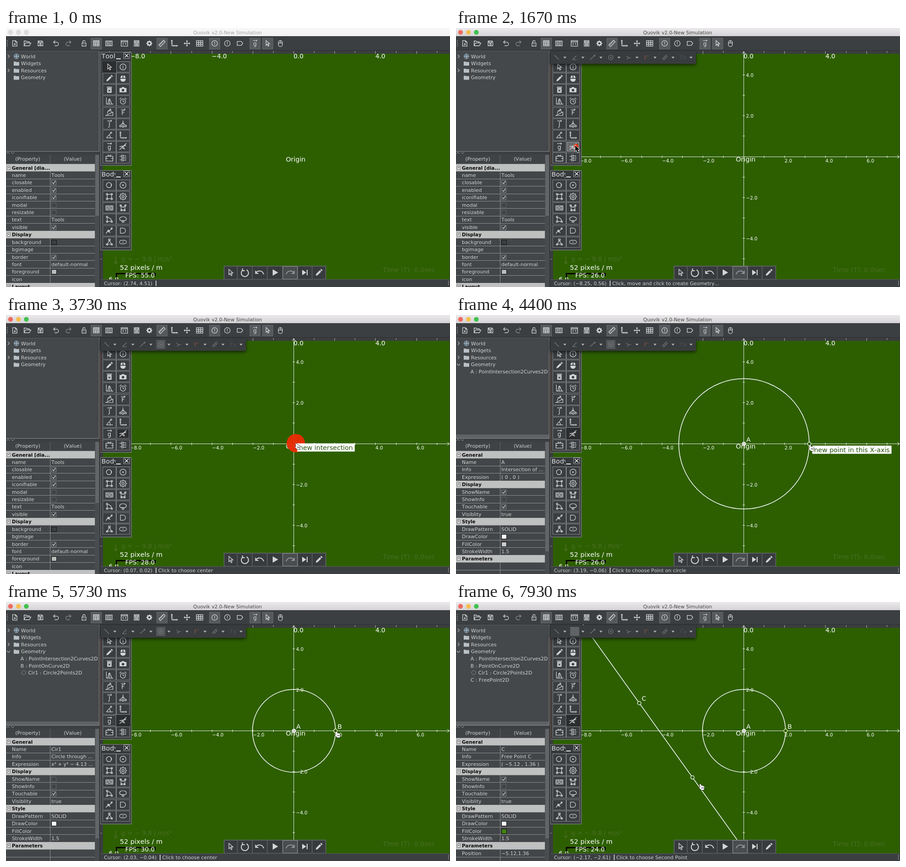
An HTML page with a canvas for the animation above (8 s loop, 979 px wide and 572 px high).

```html
<!DOCTYPE html>
<html lang="en">
<head>
<meta charset="utf-8">
<title>Geometry simulation</title>
<style>
html, body { margin: 0; width: 100%; height: 100%; overflow: hidden; background: #3c3f41; }
canvas { display: block; width: 979px; height: 572px; }
</style>
</head>
<body>
<canvas id="stage" width="979" height="572"></canvas>
<script>
const g = document.getElementById('stage').getContext('2d');
const LOOP = 8000, OX = 635, OY = 284.5, UNIT = 45.1;
const FONT = '"DejaVu Sans", sans-serif';
const PANEL = '#3c3f41', LIGHT = '#d4d6d7', GREEN = '#2d5f00';

// ---------- helpers ----------
function box(x, y, w, h, fill, line) {
  if (fill) { g.fillStyle = fill; g.fillRect(x, y, w, h); }
  if (line) { g.strokeStyle = line; g.lineWidth = 1; g.strokeRect(x + .5, y + .5, w - 1, h - 1); }
}
function text(s, x, y, color = '#d0d2d3', size = 10.9, align = 'left', weight = '') {
  g.font = `${weight} ${size}px ${FONT}`;
  g.fontKerning = 'none';
  g.fillStyle = color;
  g.textAlign = align;
  g.fillText(s, x, y);
}
function path(d, color, width = 1) {
  g.strokeStyle = color;
  g.lineWidth = width;
  g.stroke(new Path2D(d));
}
function ring(x, y, r, line, fill, width = 1.4) {
  g.beginPath();
  g.arc(x, y, r, 0, 7);
  if (fill) { g.fillStyle = fill; g.fill(); }
  if (line) { g.strokeStyle = line; g.lineWidth = width; g.stroke(); }
}

// ---------- icons, drawn around 0,0; '*' means filled ----------
const C = (x, y, r) => `M${x - r} ${y}a${r} ${r} 0 1 0 ${2 * r} 0a${r} ${r} 0 1 0 ${-2 * r} 0`;
function gearPath(r) {
  let d = '';
  for (let i = 0; i < 32; i++) {
    const a = (i - .5) * Math.PI / 16, k = i % 4 < 2 ? r : r * .74;
    d += `${i ? 'L' : 'M'}${(k * Math.cos(a)).toFixed(2)} ${(k * Math.sin(a)).toFixed(2)}`;
  }
  return d + 'Z';
}
const ICONS = {
  file: 'M-5-7H2L6-3V7H-5ZM2-7V-3H6M-2 2H3M.5-.5V4.5',
  folder: 'M-8 6V-6H-3L-1-4H5V-1M-8 6L-5-1H9L5 6Z',
  save: 'M-6-6H4L6-4V6H-6ZM-4-6V-2H3V-6' + C(0, 2, 2),
  undo: 'M-2-7L-6-3L-2 1M-6-3H2a4 4 0 0 1 0 9H-3',
  redo: 'M2-7L6-3L2 1M6-3H-2a4 4 0 0 0 0 9H3',
  lock: 'M-5-1H5V7H-5ZM-3-1V-4a3 3 0 0 1 6 0M0 2V4',
  table: 'M-7-7H7V6H-7ZM-7-5H7M-7-2H7M-7 2H7M-2-2V6M3-2V6',
  panel: 'M-8-6H8V6H-8ZM2-6V6M-6-3H0M-6 0H0M-6 3H0M4-3H6M4 0H6M4 3H6',
  code: 'M-8-7H8V7H-8ZM-8-4H8M-2-1L-4 1L-2 3M2-1L4 1L2 3',
  calc: 'M-6-7H6V7H-6ZM-4-5H4V-2H-4ZM-4 1H4M-4 4H4M-2-1V6M2-1V6',
  gear: '*' + gearPath(7.5) + C(0, 0, 2.6),
  ruler: 'M-8 4L4-8L8-4L-4 8ZM-5 1L-3 3M-2-2L0 0M1-5L3-3',
  axes: 'M-6-8V6H8M-8-6L-6-8L-4-6M6 4L8 6L6 8M-2 4V8M2 4V8M-8 1H-4M-8-3H-4',
  move: 'M-7 0H7M0-7V7M-5-2L-7 0L-5 2M5-2L7 0L5 2M-2-5L0-7L2-5M-2 5L0 7L2 5',
  grid: 'M-8-7H8V7H-8ZM-8-2.3H8M-8 2.3H8M-2.7-7V7M2.7-7V7',
  info: C(0, 0, 7) + 'M0-4V1M0 2.5V4',
  about: C(0, 0, 7) + 'M0 4V-1M0-2.5V-4',
  tag: 'M-7-5H3L7 0L3 5H-7Z',
  arrow: 'M-4-7V5L-1 2L1 7L3 6L1 1H5Z',
  mouse: 'M-5-2a5 5 0 0 1 10 0V3a5 5 0 0 1-10 0ZM-5-1H5M0-7V-1',
  pencil: '*M-7 7L-6 3L2-5L5-2L-3 6ZM3-6L5-8L8-5L6-3Z',
  mouse2: '*M-6-1a6 7 0 0 1 5-6V-1ZM1-7a6 7 0 0 1 5 6H1ZM-6 1H6V3a6 5 0 0 1-12 0Z',
  trash: '*M-6-7H6V-5H-6ZM-5-4H5V7H-5ZM-2-1L0 1L2-1L3 0L1 2L3 4L2 5L0 3L-2 5L-3 4L-1 2L-3 0Z',
  camera: '*M-8-4H-4L-2-6H2L4-4H8V6H-8Z' + C(0, 1, 3),
  graph: 'M-7-8V7H9M-5 7C-2 7-3-5 0-5S3 7 7 7M0-5V7',
  clock: C(0, 1, 6) + 'M0-3V1L3 2M-8-4L-4-8M8-4L4-8',
  slope: 'M-8 7H8V-1ZM-5 3L-3-4L3-6L5 0M-1-2L3-8M0-8H3V-5',
  forks: 'M0-8V-3L-5 3M0-3L5 3M0-3V3' + C(-6, 5, 2) + C(0, 6, 2) + C(6, 5, 2),
  angle: 'M-7 6H8M-7 6L3-5M-1-1a7 7 0 0 1 3 7' + C(4, -6, 1.5),
  geom: 'M-8 7L8-8M-8 0L5-2M0-1L4 6M-3 2L2 5M4-4L7-2',
  frame: 'M-8-4H8V7H-8ZM-9 1H-4M4 1H9M-3-8V-4M3-8V-4M-2-6H2',
  piston: 'M-8-4H-3V4H-8M-3-8V8M0-8V8M0 0H8M0-5H6V-3M0 5H6V3',
  disc: C(-1, 0, 6) + 'M5-1V1M4-2V2',
  wheel: C(0, 0, 7) + 'M-1-1H1V1H-1Z',
  quad: 'M-5-5H5V5H-5ZM-7-7H-4V-4H-7ZM4-7H7V-4H4ZM-7 4H-4V7H-7ZM4 4H7V7H4Z',
  cog: gearPath(8) + C(0, 0, 2.5),
  brick: 'M-8-5H8V5H-8ZM-8-1.7H8M-8 1.7H8M-3-5V-1.7M4-5V-1.7M0-1.7V1.7M-4 1.7V5M4 1.7V5',
  poly: 'M-5-5L0-1L5-5L4 5H-4ZM-7-7H-4V-4H-7ZM4-7H7V-4H4ZM-5 4H-2V7H-5ZM2 4H5V7H2Z',
  arc: 'M-5-4V5H5A9 9 0 0 0-5-4M-7-7H-4V-4H-7ZM-7 4H-4V7H-7ZM4 4H7V7H4Z',
  oval: 'M-8-1a8 5 0 0 1 16 0a8 5 0 0 1-16 0M-2 3H2V7H-2Z',
  curve: 'M-8 7C-4-3 2 3 7-7M-4-2L2 5' + C(-2, 1, 2) + C(5, -5, 1.5),
  half: 'M-6-6H0a6 6 0 0 1 0 12H-6Z',
  tri: 'M0-4L-5 5H5ZM-2-7H2V-4H-2ZM-7 4H-4V7H-7ZM4 4H7V7H4Z',
  belt: 'M-4-4H4a4 4 0 0 1 0 8H-4a4 4 0 0 1 0-8M-2 0H2',
  reset: 'M-5-5A8 8 0 1 0 4-6M-5-9V-4H0',
  back: 'M-9-4V2H-3M-9 2C-5-5 5-6 9 4',
  ahead: 'M9-4V2H3M9 2C5-5-5-6-9 4',
  play: '*M-5-7L7 0L-5 7Z',
  step: '*M-6-6L3 0L-6 6ZM4-6H6V6H4Z'
};
function icon(name, x, y, scale = 1, color = LIGHT, width = 1.3) {
  g.save();
  g.translate(x, y);
  g.scale(scale, scale);
  const d = ICONS[name];
  if (!d) {                       // vector letter
    text(name, 0, 6, color, 14, 'center');
    path('M-5-7H5M3-9L5-7L3-5', color, 1.2);
  } else if (d[0] === '*') {
    g.fillStyle = color;
    g.fill(new Path2D(d.slice(1)), 'evenodd');
  } else path(d, color, width);
  g.restore();
}

// ---------- timeline: time, x, y, and 1 for a steady move ----------
const MOVES = [
  [0, 758.6, 81.1], [400, 758.6, 81.1], [401, 430, 350], [1150, 262.9, 259.2], [1750, 262.9, 259.2],
  [2050, 335, 90], [2300, 360, 66], [3000, 345, 70], [3180, 345, 72], [3600, 638.2, 283.6],
  [3850, 638.2, 283.6], [4330, 778.9, 287.2], [4600, 778.9, 287.2], [4870, 795, 222],
  [5200, 775, 240], [5400, 775, 240], [5660, 726.6, 286.3], [5880, 726.6, 286.3],
  [6240, 308.9, 79.4], [6320, 308.9, 79.4], [6380, 281, 66], [6560, 281, 66], [6700, 259.5, 94.5],
  [6900, 259.5, 94.5], [7380, 404.1, 223.2], [7600, 404.1, 223.2],
  [7888, 521, 387, 1], [7930, 536.7, 401.8, 1], [8000, 560, 424, 1]
];
const CLICKS = [[1370, 265, 261], [3725, 639, 283], [6410, 281, 65], [6850, 260, 95], [7480, 404, 223]];
const FPS = [[0, 55], [400, 52], [700, 45], [1000, 38], [1270, 31], [1600, 26], [2130, 27], [2700, 29],
  [3300, 28], [3870, 27], [4330, 26], [4870, 28], [5400, 30], [5900, 29], [6300, 27], [6900, 25], [7600, 24]];
const HINTS = [[0, ''], [1470, 'Click, move and click to create Geometry...'], [3200, 'Click to choose center'],
  [3800, 'Click to choose Point on circle'], [5730, 'Click to choose center'],
  [6900, 'Click to choose First Point'], [7600, 'Click to choose Second Point']];
const at = (list, t) => list.filter(k => k[0] <= t).pop()[1];

function pointer(t) {
  let i = MOVES.length - 2;
  while (i > 0 && MOVES[i][0] > t) i--;
  const [t0, x0, y0] = MOVES[i], [t1, x1, y1, steady] = MOVES[i + 1];
  const u = Math.max(0, Math.min(1, (t - t0) / (t1 - t0))), s = steady ? u : u * u * (3 - 2 * u);
  return [x0 + (x1 - x0) * s, y0 + (y1 - y0) * s];
}
const menuOpen = t => t >= 6470 && t < 6900;
const inField = (p, t) => p[0] > 208 && p[1] > 79.2 && !menuOpen(t);
// last pointer place inside the drawing field
function fieldPoint(t) {
  for (; t > 0; t -= 10) {
    const p = pointer(t);
    if (inField(p, t)) return p;
  }
  return pointer(0);
}

// ---------- window chrome ----------
const BAR = [['file', 19], ['folder', 47], ['save', 76], ['undo', 110], ['redo', 138], ['lock', 172],
  ['table', 199, 1], ['panel', 227], ['code', 261], ['calc', 288], ['gear', 316], ['ruler', 344, 1],
  ['axes', 371], ['move', 399], ['grid', 427], ['info', 460, 1], ['info', 488], ['tag', 516],
  ['g', 549, 1], ['arrow', 577, 1], ['mouse', 605]];

function chrome(active) {
  const grad = g.createLinearGradient(0, 0, 0, 18);
  grad.addColorStop(0, active ? '#ebe9eb' : '#f7f7f7');
  grad.addColorStop(1, active ? '#d5d3d5' : '#f3f3f3');
  box(0, 0, 979, 18, grad);
  ['#ee6a5f', '#f5bd4f', '#3fc24c'].forEach((c, i) =>
    ring(10 + i * 17.4, 9.5, 5.2, active ? null : '#cfcfcf', active ? c : '#dcdcdc', .6));
  text('Quovik v2.0-New Simulation', 488.5, 13.5, active ? '#454545' : '#a2a2a2', 10.7, 'center');
  box(0, 18, 979, 32, PANEL);
  box(0, 49, 979, 1, '#2c2e30');
  for (let y = 27; y < 43; y += 4) box(2, y, 2, 2, '#85888a');
  for (const [name, x, on] of BAR) {
    if (on) box(x - 12, 22, 24, 25, '#56595c', '#686b6d');
    icon(name, x, 34, .88, name === 'redo' ? '#8c8f91' : LIGHT, 1.5);
  }
}

function tree(t) {
  box(0, 50, 206, 223, '#45484a');
  box(0, 50, 206, 1, '#5c5f61');
  const open = t >= 3800;
  const row = (s, i, x = 33) => text(s, x, 66.5 + i * 15.6);
  ['World', 'Widgets', 'Resources', 'Geometry'].forEach((s, i) => {
    row(s, i);
    const y = 62.5 + i * 15.6;
    if (i) {
      box(17, y - 4, 5, 2, '#a9b2b8');
      box(17, y - 3, 12, 8, '#b9c1c6');
    } else {
      ring(23, y, 5.5, '#8aa0b0', '#5f7482', 1);
      path(`M18 ${y}H28M23 ${y - 5}V${y + 5}`, '#c2ccd2');
    }
  });
  path('M4 59L7.5 62.5L4 66M4 90L7.5 93.5L4 97', '#b5b7b9', 1.2);
  if (open) {
    path('M2 108L5.5 111.5L9 108', '#b5b7b9', 1.2);
    row('A : PointIntersection2Curves2D', 4, 32);
    box(0, 264, 205, 8, '#606365');
  }
  if (t >= 5730) {
    row('B : PointOnCurve2D', 5, 32);
    ring(39, 156, 4.5, '#85888a', null, 1);
    row('Cir1 : Circle2Points2D', 6, 49);
  }
  if (t >= 7600) row('C : FreePoint2D', 7, 32);
  box(0, 272, 206, 1, '#8a8d8f');
  box(205, 50, 1, 222, '#8a8d8f');
  box(0, 273, 206, 7, PANEL);
  path('M1 278L4.500 274L8 278M11 274L14.500 278L18 274', '#a5a7a9');
}

function rows(t) {
  if (t < 3800) return ['#General [dia...', 'name|Tools', 'closable|+', 'enabled|+', 'iconifiable|+', 'modal|-',
    'resizable|-', 'text|Tools', 'visible|+', '#Display', 'background|@#3c3f41', 'bgimage|', 'border|+',
    'font|default-normal', 'foreground|@#bbbbbb', 'icon|', '#Layout'];
  const [name, info, expr, show, fill, extra] =
    t < 5730 ? ['A', 'Intersection of ...', '( 0 , 0 )', '+', '@#cccccc', '|'] :
    t < 7600 ? ['Cir1', 'Circle through ...', 'x² + y² − 4.13 ...', '-', '', '|'] :
      ['C', 'Free Point C', '( −5.12 , 1.36 )', '+', '@#3f850c', 'Position|−5.12,1.36'];
  return ['#General', 'Name|' + name, 'Info|' + info, 'Expression|' + expr, '#Display', 'ShowName|' + show,
    'ShowInfo|-', 'Touchable|+', 'Visiblity|true', '#Style', 'DrawPattern|SOLID', 'DrawColor|@#ffffff',
    'FillColor|' + fill, 'StrokeWidth|1.5', '#Parameters', extra, '|'];
}

function properties(t) {
  box(0, 280, 206, 292, '#434648');
  box(0, 280, 196, 20, '#404345');
  text('(Property)', 48, 293, '#d0d2d3', 10.9, 'center');
  text('(Value)', 147, 293, '#d0d2d3', 10.9, 'center');
  box(97, 280, 1, 20, '#606365');
  rows(t).forEach((r, i) => {
    const y = 300.3 + i * 16.42, mid = y + 8.2;
    if (r[0] === '#') {
      box(0, y, 196, 16.4, '#bfc0c0');
      box(2, Math.round(mid) - 4, 8, 8, '#e4e4e4', '#777777');
      box(4, Math.round(mid) - 1, 4, 1, '#222222');
      text(r.slice(1), 13, mid + 4, '#0c0c0c', 10.4, 'left', 'bold');
      return;
    }
    const [key, val] = r.split('|'), m = Math.round(mid);
    text(key, 13, mid + 4);
    box(0, Math.round(y + 16), 196, 1, '#8f9294');
    box(97, y, 1, 16.4, '#8f9294');
    if (val === '+' || val === '-') {
      box(100, m - 5, 11, 11, '#404345', val === '+' ? '#85888a' : '#65686a');
      if (val === '+') path(`M102.500 ${m}L105 ${m + 3}L109 ${m - 3}`, '#c6c8c9', 1.4);
    } else if (val[0] === '@') box(100, m - 5, 12, 11, val.slice(1), '#111111');
    else text(val, 100, mid + 4);
  });
  box(196, 280, 10, 292, '#494c4e');
  box(197, 280, 8, t < 3800 ? 135 : 242, '#626567');
  box(206, 50, 2, 522, '#323537');
}

// ---------- drawing field ----------
const SOFT = 'rgba(165,150,150,.25)';
const num = (v, n = 1) => v.toFixed(n).replace('-', '−');
const knob = (x, y, fill = GREEN, line = '#fff') => ring(x, y, 3.8, line, fill, 1.3);

function field(t) {
  box(208, 50, 771, 506, '#3a3d3f');
  box(214, 57, 764, 498, GREEN);
  for (let v = -9; v < 8; v++) box(Math.round(OX + v * UNIT) - 1, 51, 1, v % 2 ? 4 : 6, '#b0b2b3');
  box(208, 510, 3, 1, '#b0b2b3');
  g.save();
  g.beginPath();
  g.rect(208, 50, 770, 505);
  g.clip();
  for (const v of [-8, -4, 0, 4]) text(num(v), OX - 1 + v * UNIT, 66.5, '#fff', 13.8);
  text(num(-6), 215, 560, '#fff', 13.8);
  if (t >= 1470) axes();
  text('Origin', 617, 295, '#fff', 14.4);
  shapes(t);
  path('M242 505V521M238 516L242 521L246 516', SOFT, 1.5);
  text('g = − 9.8 j m/s²', 254, 515, SOFT, 14);
  text('Time (T): 0.0sec', 831, 539, SOFT, 14.2);
  path('M243.500 551V542.500H328.500V548', '#050505', 3);
  text('52 pixels / m', 251, 534, '#fff', 14.6);
  text('FPS: ' + at(FPS, t).toFixed(1), 263, 551, '#fff', 13.9);
  g.restore();
}

function axes() {
  const ink = '#e8eee4', ax = OX - .5;
  path(`M${ax} 525V52M${ax - 3.5} 57L${ax} 52L${ax + 3.5} 57M277 ${OY}H978M973 281L978 ${OY}L973 288`, ink, 1);
  for (let v = -8; v < 8; v++) {
    if (!v) continue;
    const x = Math.round(OX + v * UNIT) - .5, y = Math.round(OY - v * UNIT) - .5;
    path(`M${x} 282V287`, ink);
    if (y > 60 && y < 525) path(`M632 ${y}H637`, ink);
    if (v % 2) continue;
    text(num(v), x, 297, '#fff', 10.4);
    if (Math.abs(v) < 5) text(num(v), 639.5, y + 4.5, '#fff', 10.4);
  }
}

function shapes(t) {
  const p = fieldPoint(t - 42);
  const y = Math.abs(p[1] - OY) < 6 ? OY : p[1];
  if (t >= 3800) {
    const r = t < 5730 ? Math.hypot(p[0] - OX, y - OY) : 91.6;
    ring(OX, OY, r, '#fff', null, 1.5);
  }
  if (t >= 7600) {
    const cx = 404.1, cy = 223.2, dx = p[0] - cx, dy = p[1] - cy, d = Math.hypot(dx, dy);
    if (d > 1) {
      const k = 900 / d;
      path(`M${cx - dx * k} ${cy - dy * k}L${cx + dx * k} ${cy + dy * k}`, '#fff', 1.5);
    }
    knob(cx, cy);
    text('C', 409.500, 218, '#fff', 14);
  }
  if (t > 3200) knob(p[0], y);
  if (t >= 3800) {
    knob(OX, OY, '#d5d5d5');
    text('A', 640, 279.5, '#fff', 14);
  }
  if (t >= 5730) {
    knob(726.6, OY, GREEN, '#eef2b8');
    text('B', 731, 279.5, '#fff', 14);
  }
}

// ---------- floating panels ----------
const TOOLS = ['arrow', 'about', 'pencil', 'mouse2', 'trash', 'camera', 'graph', 'clock', 'slope', 'F',
  'J', 'forks', 'angle', 'axes', 'g', 'geom', 'frame', 'piston'];
const BODIES = ['disc', 'wheel', 'quad', 'cog', 'brick', 'poly', 'arc', 'oval', 'curve', 'half', 'tri', 'belt'];

function palette(title, y, h, names, first, t) {
  box(208, y, 69, h, '#36393b', '#85888a');
  box(211, y + 20, 64, h - 22, null, '#4a4d4f');
  text(title, 210.500, y + 13.5, '#dddfe0', 14.4);
  box(241, y + 1, 34, 16, '#36393b');
  box(243, y + 14, 10, 2, '#e4e4e4');
  box(259, y + 1, 14, 14, '#2c2f31', '#a5a7a9');
  path(`M262 ${y + 4}L270 ${y + 12}M270 ${y + 4}L262 ${y + 12}`, '#f0f0f0', 1.5);
  names.forEach((name, i) => {
    const x = i % 2 ? 258 : 228, cy = first + (i >> 1) * 25.15, top = Math.round(cy - 12);
    const geom = name === 'geom', on = geom ? t >= 1370 : name === 'arrow' && t < 1370;
    const held = geom && t >= 1370 && t < 1900;
    box(x - 15, top, 30, 24, held ? '#696c6e' : on ? '#2b2d2f' : '#3b3e40', on ? '#232527' : '#85888a');
    if (geom && t >= 1370 && t < 3800) {
      g.setLineDash([1, 1]);
      box(x - 14, top + 1, 28, 22, null, '#f2f2f2');
      g.setLineDash([]);
    }
    icon(name, x, cy, .95, LIGHT, geom ? 1.5 : 1.3);
  });
}

const GEO = ['M-5-5L5 5', 'M-5 5L4-4M-5 5H4', 'M-6 5L5-5M2-5H5V-2', C(0, 0, 5) + C(0, 0, 1),
  'M-5-3L0 1L5 0M0 1L-4 4', 'M-4-5V5M-4 4A6 6 0 0 1 4-3', 'M-6 4L4-6M-3 6L6-3', 'M-4 4V-4H0M2 4L6-2M2-2L6 4'];
function geoBar(t) {
  if (t < 1470) return;
  g.save();
  g.shadowColor = 'rgba(0,0,0,.6)';
  g.shadowBlur = 7;
  g.shadowOffsetY = 3;
  box(208, 51, 321, 28, '#393c3e');
  g.restore();
  box(208, 80, 1, 223, '#8c5c48');
  GEO.forEach((d, i) => {
    const x = 222 + i * 39.75;
    const lineOn = i === 1 && t >= 6900;
    if (lineOn || i === 3 && t >= 3200 && t < 6900) box(x - 10, 55, 20, 20, lineOn ? '#606365' : '#55585a');
    if (!lineOn) {
      g.save();
      g.translate(x, 65);
      path(d, i === 5 ? '#86524c' : i === 7 ? '#4d5560' : '#7d8082', 1.1);
      g.restore();
    }
    g.fillStyle = '#b5b7b9';
    g.fill(new Path2D(`M${x + 14.5} 63.500H${x + 21.500}L${x + 18} 67.500Z`));
  });
}

const PLAYER = [['arrow', 481, 510], ['reset', 510, 543], ['back', 543, 576], ['play', 576, 610],
  ['ahead', 610, 643], ['step', 643, 675], ['pencil', 675, 705]];
function player() {
  box(480, 525, 226, 30, '#36393b', '#606365');
  for (const [name, a, b] of PLAYER) {
    const on = name === 'ahead';
    box(a, 526, b - a, 29, on ? '#4a4d4f' : '#383b3d', on ? '#8f9294' : '#55585a');
    icon(name, (a + b) / 2, 540, 1, on ? '#96999b' : LIGHT, name === 'arrow' ? 1.3 : 2);
  }
}

function status(t) {
  const p = fieldPoint(t);
  box(208, 555, 771, 17, PANEL);
  box(208, 555, 771, 1, '#55585a');
  const s = `Cursor: (${num((p[0] - OX) / UNIT, 2)}, ${num((OY - p[1]) / UNIT, 2)})`;
  text(s, 216, 567.5);
  const x = Math.round(216 + g.measureText(s).width + 7);
  box(x, 558, 1.5, 12, '#f0f0f0');
  text(at(HINTS, t), x + 5.5, 567.5);
  box(975, 558, 1, 11, '#9a9c9e');
}

const MENU = [['Line 2 Points', 91], ['Segments 2 points', 111], ['Ray 2 Points', 131], ['Parallel line', 158],
  ['Perpendicular line', 178], ['Angle Bisector of 2 Lines', 198], ['Line at Angle to X axis', 225],
  ['Line at Angle to another Line', 245], ['Normal on curve', 271.5], ['Tangent on curve', 291.5],
  ['Reflected ray', 318], ['Line from Equationn', 345]];
function menu(t) {
  if (!menuOpen(t)) return;
  g.save();
  g.shadowColor = 'rgba(0,0,0,.5)';
  g.shadowBlur = 6;
  box(106, 80, 182, 279, PANEL);
  g.restore();
  box(106, 80, 182, 279, null, '#75787a');
  for (const y of [143, 210, 257, 303, 330]) box(108, y, 178, 1, '#55585a');
  const hot = t > 6640;
  if (hot) box(108, 82, 178, 18.500, '#fcfcfc');
  MENU.forEach(([s, y], i) => {
    text(s, 125, y + 4, hot && !i ? '#a5a7a8' : '#d0d2d3');
    if (i === 11) text('L=0', 108, y + 3, '#3f8a1c', 7);
    else path(`M109 ${y + 5}L118 ${y - 4}`, '#85888a');
    if (i > 5 && i < 10) path(`M111 ${y - 2}L116 ${y + 3}`, '#a04a40');
  });
}

// ---------- overlays ----------
function tip(s, x, y) {
  g.font = `14.3px ${FONT}`;
  box(x, y, g.measureText(s).width + 8, 18, '#fff');
  text(s, x + 4, y + 14, '#24500a', 14.3);
}

function overlays(t) {
  const [x, y] = pointer(t);
  for (const [t0, cx, cy] of CLICKS) {
    const u = (t - t0) / 400;
    if (u >= 0 && u < 1) ring(cx, cy, 20.5 * (1 - u), null, 'rgba(236,44,4,.95)');
  }
  if (t >= 3580 && t < 3800) tip('new intersection', 642, 283.5);
  if (t > 3950 && t < 5730 && Math.abs(y - OY) < 6) tip('new point in this X-axis', x + 6.5, 288.5);
  if (t < 400) return;
  g.save();
  g.translate(x, y);
  const hand = t > 3200 && inField([x, y], t);
  const d = new Path2D(hand
    ? 'M0 1C1-1 3 0 3.500 2L4 4C5 3 6 3 6.500 4C7.500 3.500 8.500 4 9 5C10 4.500 10.500 5.500 10.500 7L9.500 13H3.500L-1 8C-1 6.500 .5 6.500 1.500 7.500Z'
    : 'M0 0V13L3 10.500L5.500 16L8 15L5.500 9.500H9.500Z');
  g.lineJoin = 'round';
  g.strokeStyle = hand ? '#1c1c1c' : '#fff';
  g.lineWidth = hand ? 1.2 : 1.6;
  g.stroke(d);
  g.fillStyle = hand ? '#fff' : '#080808';
  g.fill(d);
  if (hand) path('M4.500 7V10M6.500 7V10M8.500 7V10', '#333');
  g.restore();
}

function draw(t) {
  const away = t < 1270 || t >= 2600 && t < 3130 || menuOpen(t);
  field(t);
  chrome(!away);
  tree(t);
  properties(t);
  palette('Tool', 53, 251, TOOLS, 86, t);
  palette('Body', 314, 177, BODIES, 347, t);
  player();
  status(t);
  geoBar(t);
  if (t >= 6240 && t < 6900) knob(308.9, 79.4);
  menu(t);
  overlays(t);
}

const start = performance.now();
function tick() {
  draw((performance.now() - start) % LOOP);
  requestAnimationFrame(tick);
}
tick();
</script>
</body>
</html>
```
